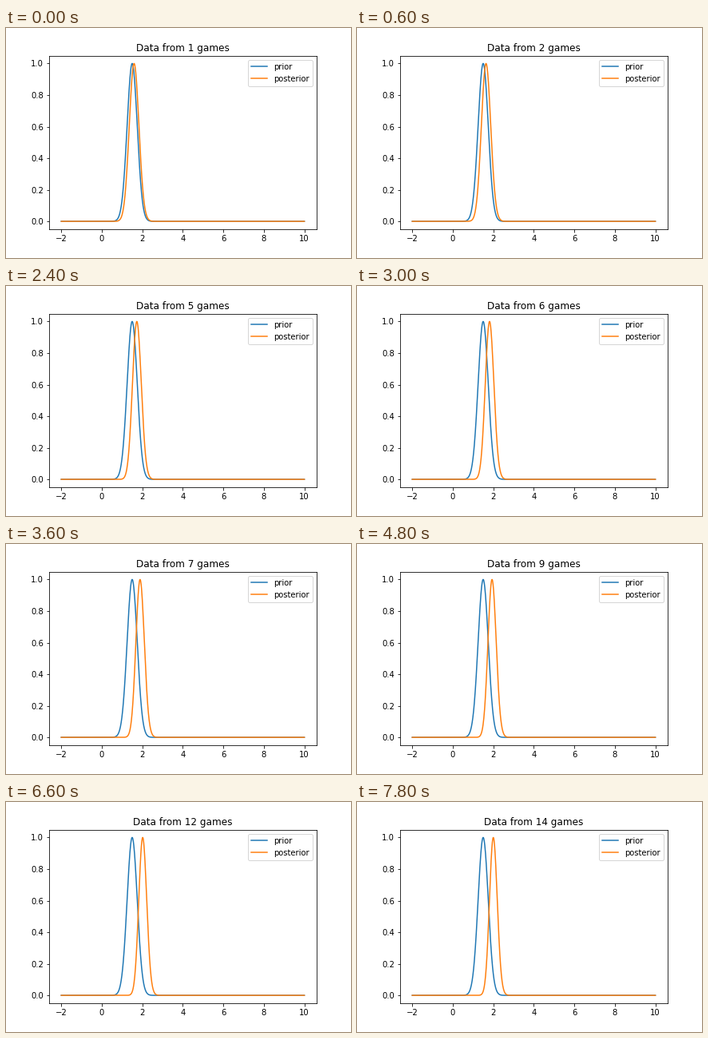
A matplotlib script for the animation above (8000 ms loop, 432 px wide and 288 px high).

```python
import numpy as np
import matplotlib.pyplot as plt
from matplotlib.animation import FuncAnimation

GOALS = [4, 3, 2, 3, 3, 5, 5, 3, 3, 4, 3, 3, 2, 1]
PRIOR_MEAN, PRIOR_SD = 1.5, 0.25
STEP_MS = 200
FRAMES_PER_GAME = 3
TOTAL_FRAMES = 40

x = np.linspace(-2, 10, 1000)
log_prior = -0.5 * ((x - PRIOR_MEAN) / PRIOR_SD) ** 2


def posterior(games):
    """Gaussian prior times Poisson likelihood, scaled to a peak of one."""
    rate = np.clip(x, 1e-12, None)
    log_post = log_prior + sum(GOALS[:games]) * np.log(rate) - games * rate
    return np.exp(log_post - log_post.max())


fig, ax = plt.subplots(figsize=(6, 4), dpi=72, facecolor="white")
fig.subplots_adjust(left=0.125, right=0.9, bottom=0.125, top=0.88)

ax.plot(x, np.exp(log_prior - log_prior.max()), label="prior")
post_line, = ax.plot(x, posterior(1), label="posterior")
title = ax.set_title("Data from 1 games")
ax.legend(loc="upper right")
ax.set_xlim(-2.6, 10.6)
ax.set_ylim(-0.05, 1.05)


def update(frame):
    games = frame // FRAMES_PER_GAME + 1
    post_line.set_ydata(posterior(games))
    title.set_text(f"Data from {games} games")
    return post_line, title


anim = FuncAnimation(fig, update, frames=TOTAL_FRAMES, interval=STEP_MS,
                     repeat=True, repeat_delay=0, blit=False)
plt.show()
```
